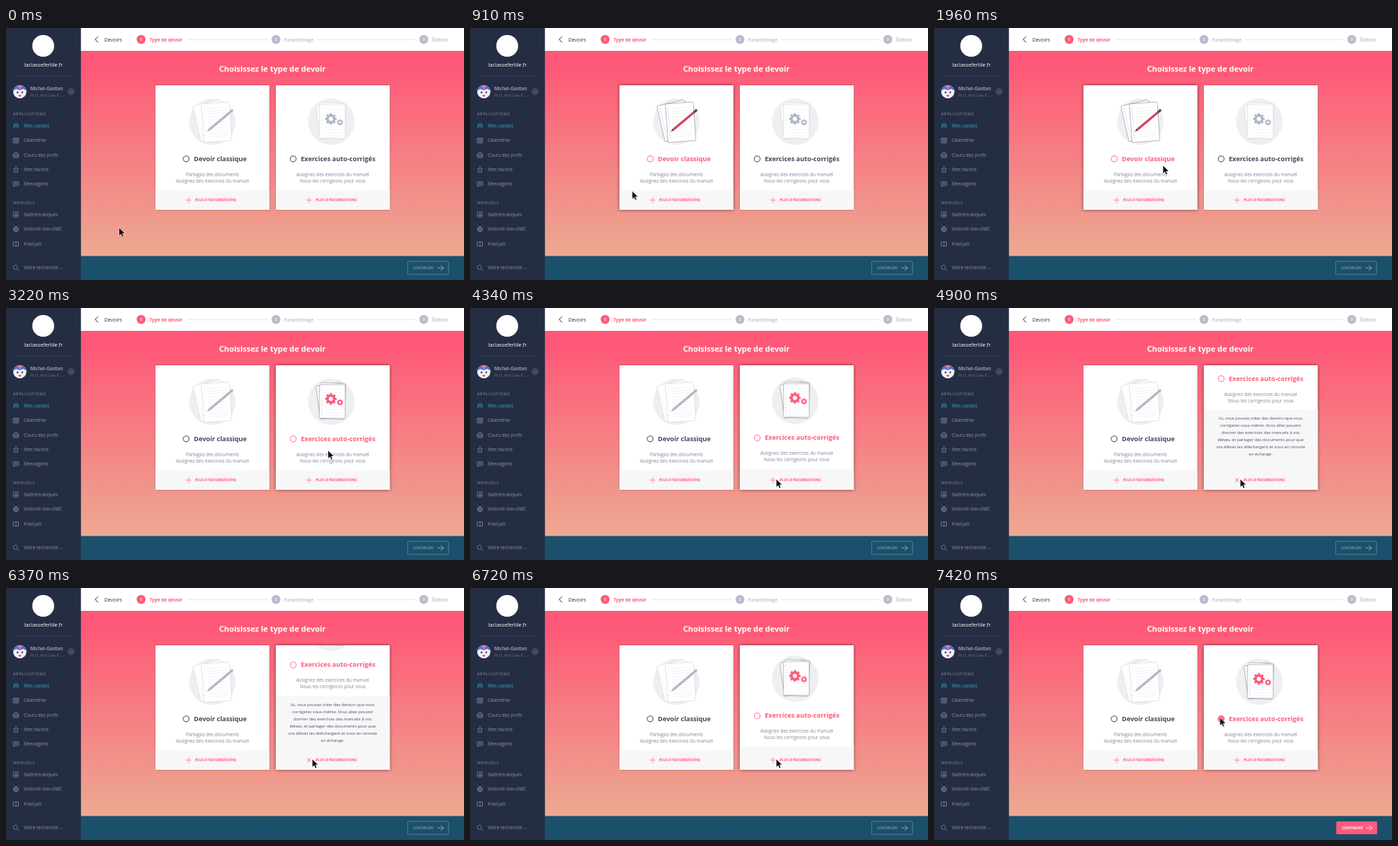
Write an HTML page that moves like this. It is 640 by 352 pixels and loops after 8.26 s.

```html
<!DOCTYPE html>
<html lang="fr">
<head>
<meta charset="utf-8">
<title>Choisissez le type de devoir</title>
<style>
@property --h { syntax: "<number>"; inherits: true; initial-value: 0; }
html, body { margin: 0; width: 100%; height: 100%; overflow: hidden; }
svg { display: block; width: 100vw; height: 100vh; font-family: "Open Sans", "Noto Sans", sans-serif; }
.mid { text-anchor: middle; }
.line { fill: none; stroke-linecap: round; stroke-linejoin: round; }
.menu { font-size: 6.5px; fill: #8d94a8; stroke: #8d94a8; }
.menu.on { fill: #14b8cb; stroke: #14b8cb; }
.menu text { stroke: none; }
.menu path { fill: none; stroke-width: .7; }
.head { font-size: 5.6px; font-weight: 600; letter-spacing: .62px; fill: #737b92; }
.step { font-size: 6.6px; font-weight: 600; fill: #b9bdcb; }
.step.on { font-size: 6.4px; font-weight: 700; fill: #ff5a7b; }
.step .num { font-size: 6px; fill: #fff; }
.box { fill: #fff; filter: drop-shadow(0 calc(.4px + .4px * var(--h)) calc(.8px + 1.5px * var(--h)) rgb(40 10 20 / calc(.42 + .25 * var(--h)))); }
.name { font-size: 9.1px; font-weight: 700; fill: color-mix(in srgb, #40475f, #ff5a7b calc(var(--h) * 100%)); }
.radio { fill: #fff; stroke-width: calc(1.15px - .25px * var(--h)); stroke: color-mix(in srgb, #565d76, #ff5a7b calc(var(--h) * 100%)); }
.desc { font-size: 6.5px; fill: #81879b; }
.more { font-size: 5px; font-weight: 700; fill: #ff5a7b; }
.plus { stroke: #ff5a7b; stroke-width: .65; transform-box: fill-box; transform-origin: center; }
.sheet { fill: #fff; stroke-width: .55; stroke: color-mix(in srgb, #ccd0da, #7d849a calc(var(--h) * 100%)); }
.rows { stroke: #e6e8ed; stroke-width: .5; }
.tint { color: color-mix(in srgb, #b1b6c3, #ff5a7b calc(var(--h) * 100%)); }
.lead { color: color-mix(in srgb, #b1b6c3, #d8435f calc(var(--h) * 100%)); }
.dark { color: color-mix(in srgb, #b1b6c3, #40475f calc(var(--h) * 100%)); }
.tint, .lead, .dark { fill: currentColor; }
.gear circle { fill: none; stroke: currentColor; }
.info { font-size: 5.85px; font-weight: 500; fill: #474d64; }
.panel { fill: #f7f7f8; }
</style>
</head>
<body>
<svg viewBox="0 0 640 352" preserveAspectRatio="none"></svg>
<script>
const LOOP = 8260, TICK = 70, RISE = 84;
const stage = document.querySelector('svg');

const text = (x, y, label, cls = '') => `<text x="${x}" y="${y}" class="${cls}">${label}</text>`;

const menuItem = ([y, label, icon, on]) => `
  <g class="menu ${on ? 'on' : ''}">
    <path class="line" transform="translate(10 ${y - 4})" d="${icon}"/>
    ${text(25, y + 2.2, label)}
  </g>`;

const menu = [
  [136.5, 'Mes classes', 'M2.2 2.6a1.8 1.8 0 1 0 3.6 0a1.8 1.8 0 1 0-3.6 0M1.4 7.6Q1.6 4.8 4 4.8T6.6 7.6M1.6 1.2Q.2 2.4 1.4 3.8Q.2 4.6 0 6.6M6.4 1.2Q7.8 2.4 6.6 3.8Q7.8 4.6 8 6.6', true],
  [157, 'Calendrier', 'M.5 1.2H7.5V7.6H.5ZM.5 3H7.5M2.3.3V1.8M5.7.3V1.8M2 4.6H6M2 6H6'],
  [177.5, 'Cours des profs', 'M.5 3.2H7.5V7.5H.5ZM1.2 3L2 .8H6L6.8 3M.5 5H2.6V6H5.4V5H7.5'],
  [198, 'Mes favoris', 'M4 .3L5.1 2.8 7.8 3.1 5.8 4.9 6.4 7.6 4 6.2 1.6 7.6 2.2 4.9.2 3.1 2.9 2.8Z'],
  [218, 'Messagerie', 'M.5.8H7.5V6H3.2L1.5 7.5V6H.5ZM2 2.6H6M2 4.2H5'],
  [260.5, 'Mathématiques', 'M.8.5H7.2V7.5H.8ZM2.2 6L4 2.2 5.8 6M2.8 4.8H5.2'],
  [281, 'Histoire-Géo-EMC', 'M.4 4a3.6 3.6 0 1 0 7.2 0a3.6 3.6 0 1 0-7.2 0M.4 4H7.6M4 .4Q.8 4 4 7.6Q7.2 4 4 .4'],
  [301.5, 'Français', 'M.5 1H3.2L4 1.8 4.8 1H7.5V7H4.8L4 7.6 3.2 7H.5ZM4 1.8V7.6'],
  [335, 'Votre recherche ...', 'M.3 3.3a2.9 2.9 0 1 0 5.8 0a2.9 2.9 0 1 0-5.8 0M5.4 5.4L7.9 7.9'],
];

const step = (x, n, label, on) => `
  <g class="step ${on ? 'on' : ''}">
    <circle cx="${x}" cy="16" r="6.2"/>
    ${text(x, 18.3, n, 'num mid')}${text(x + 11.5, 18.6, label)}
  </g>`;

const sheet = (x, y, angle, w, h) => {
  let rows = '';
  for (let r = 7; r < h - 3; r += 4) rows += `M8 ${r}H${w - 4}`;
  return `<g transform="translate(${x} ${y}) rotate(${angle})">
    <rect class="sheet" width="${w}" height="${h}" rx="1.5"/>
    <path class="rows" d="${rows}"/>
    <path class="sheet" stroke-dasharray="1 2.6" d="M3.5 4V${h - 3}"/>
  </g>`;
};

const gear = (x, y, r) => {
  const tooth = 2 * Math.PI * r / 16;
  return `<g class="tint gear" transform="translate(${x} ${y}) rotate(-11)">
    <circle r="${r * .68}" stroke-width="${r * .5}"/>
    <circle r="${r}" stroke-width="${r * .32}" stroke-dasharray="${tooth}"/>
  </g>`;
};

const papers = sheet(261, 109, -13, 39, 51) + sheet(273, 106, -4, 39, 54) + `
  <g transform="translate(280.5 145) rotate(-40)">
    <path class="dark" d="M0 0L5-1.6V1.6Z"/>
    <rect class="lead" x="5" y="-1.6" width="37" height="3.2"/>
    <rect class="dark" x="42" y="-1.6" width="6" height="3.2" rx="1"/>
  </g>`;
const gears = sheet(433, 109, -8, 34, 47) + sheet(441, 104, 3, 34, 50) + sheet(438, 107, 0, 36, 47)
  + gear(454, 127, 7) + gear(466.7, 131.8, 3.7);

const card = ({ id, x, mid, disc, radio, name, lines, art, plus, extra = '' }) => `
  <g id="${id}">
    <rect class="box" x="${x}" y="80" width="159.3" height="174" rx="1"/>
    <clipPath id="${id}-clip"><rect x="${x}" y="80" width="159.3" height="174" rx="1"/></clipPath>
    <g clip-path="url(#${id}-clip)">
      <g class="slide">
        <circle cx="${disc}" cy="131" r="32.5" fill="#eeeff1"/>
        ${art}
        <circle class="radio" cx="${radio}" cy="182.8" r="4.1"/>
        <circle class="dot" cx="${radio}" cy="182.8" r="4.6" fill="#ff5a7b" opacity="0"/>
        ${text(radio + 10.7, 185.5, name, 'name')}
        ${lines.map((line, i) => text(mid, 206.6 + 8.9 * i, line, 'desc mid')).join('')}
        <rect class="panel" x="${x}" y="226.3" width="160" height="120"/>
      </g>
      ${extra}
      <path class="plus" d="M${plus - 4} 240.4h8M${plus} 236.4v8"/>
      ${text(plus + 9.2, 242.3, "PLUS D'INFORMATIONS", 'more')}
    </g>
  </g>`;

const info = [
  'Ici, vous pouvez créer des devoirs que vous',
  'corrigerez vous-même. Vous allez pouvoir',
  'donner des exercices des manuels à vos',
  'élèves, et partager des documents pour que',
  'vos élèves les téléchargent et vous en renvoie',
  'en échange.',
].map((line, i) => text(456.5, 156.3 + RISE + 10 * i, line, 'info mid')).join('');

const button = (x, fill, stroke, ink, weight) => `
  <rect x="${x}" y="326" width="57" height="18" rx="1" fill="${fill}" stroke="${stroke}" stroke-width=".7"/>
  <text x="${x + 7.8}" y="337" font-size="4.95" font-weight="${weight}" fill="${ink}">CONTINUER</text>
  <path class="line" d="M${x + 42} 335h8m-3.6-3.6l3.6 3.6-3.6 3.6" stroke="${ink}" stroke-width=".8"/>`;

stage.innerHTML = `
  <linearGradient id="sky" x2="0" y2="1">
    <stop offset=".05" stop-color="#ff5777"/><stop offset="1" stop-color="#eca991"/>
  </linearGradient>
  <rect width="640" height="352" fill="#fff"/>
  <rect x="104" y="32" width="536" height="287" fill="url(#sky)"/>
  <rect x="104" y="318.5" width="536" height="34" fill="#1b506c"/>

  <rect width="104.7" height="352" fill="#252d43"/>
  <circle cx="52" cy="25" r="15.3" fill="#fff"/>
  <text x="52.5" y="53.6" class="mid" font-size="7.3" font-weight="500" fill="#fff">laclassefertile.fr</text>
  <path d="M10 67.3H95" stroke="#39425a" stroke-width=".7"/>
  <clipPath id="face"><circle cx="19.3" cy="89" r="9.3"/></clipPath>
  <g clip-path="url(#face)">
    <rect x="9" y="79" width="21" height="21" fill="#f3edf5"/>
    <path d="M9 79H30V88L24 85 19 87 14 85 9 89Z" fill="#3d74d6"/>
    <path d="M14 79L19.3 86 25 79Z" fill="#ef6f93"/>
    <circle cx="16" cy="90" r="1.2" fill="#30395a"/><circle cx="22.7" cy="90" r="1.2" fill="#30395a"/>
    <ellipse cx="19.3" cy="94.5" rx="2" ry="1.3" fill="#e4587c"/>
  </g>
  <text x="33.7" y="86.7" font-size="6.6" font-weight="600" fill="#aeb5c5">Michel-Gaston</text>
  <text x="33.7" y="95.6" font-size="5.5" fill="#68718a">Prof. Hist-Géo-E...</text>
  <g class="line" stroke="#8089a0" stroke-width=".75">
    <circle cx="91" cy="89" r="1.5"/>
    <path d="M91 84.8L94.6 86.9V91.1L91 93.2 87.4 91.1V86.9Z"/>
  </g>
  ${text(9.8, 122.2, 'APPLICATIONS', 'head')}${text(9.8, 246.4, 'MANUELS', 'head')}
  ${menu.map(menuItem).join('')}

  <path class="line" d="M128.5 12L124.7 16l3.8 4" stroke="#2c3349" stroke-width="1"/>
  <text x="137.3" y="18.6" font-size="7.1" fill="#2c3349">Devoirs</text>
  <path d="M254 16.3H367M435 16.3H572" stroke="#dcdee5" stroke-width=".8"/>
  ${step(188.8, 1, 'Type de devoir', true)}${step(377.3, 2, 'Parametrage')}${step(583.8, 3, 'Édition')}

  <text x="372.3" y="61.2" class="mid" font-size="10.95" font-weight="700" fill="#fff">Choisissez le type de devoir</text>
  ${card({
    id: 'classic', x: 208.8, mid: 288.5, disc: 288.5, radio: 251.8, plus: 255, art: papers,
    name: 'Devoir classique', lines: ['Partagez des documents', 'Assignez des exercices du manuel'],
  })}
  ${card({
    id: 'auto', x: 377, mid: 456.7, disc: 454.5, radio: 401.3, plus: 423.5, art: gears,
    name: 'Exercices auto-corrigés', lines: ['Assignez des exercices du manuel', 'Nous les corrigeons pour vous'],
    extra: `<clipPath id="above"><rect x="377" y="80" width="160" height="146"/></clipPath>
      <g clip-path="url(#above)"><g class="slide">${info}</g></g>`,
  })}

  <g id="idle">${button(561.3, 'none', '#6f92a4', '#a3b9c5', 400)}</g>
  <g id="ready" opacity="0">${button(562.2, '#ff5a7b', 'none', '#fff', 700)}</g>
  <path id="cursor" d="M0 0V11.2L2.6 8.9 4.4 12.7 6.3 11.9 4.6 8.1H8.2Z" fill="#0c0c10" stroke="#fff" stroke-width=".5"/>`;

// Each step is [time, properties, easing towards the next step].
const animations = [];
const animate = (selector, steps) => {
  const all = [[0, steps[0][1]], ...steps, [LOOP, steps.at(-1)[1]]];
  const frames = all.map(([time, props, easing = 'linear']) => ({ offset: time / LOOP, easing, ...props }));
  for (const el of stage.querySelectorAll(selector)) {
    const animation = el.animate(frames, { duration: LOOP, fill: 'both' });
    animation.pause();
    animations.push(animation);
  }
};

const hover = value => ({ '--h': value });
const fade = value => ({ opacity: value });
const move = (x, y) => ({ transform: `translate(${x}px, ${y}px)` });
const turn = angle => ({ transform: `rotate(${angle}deg)` });
const toggle = (selector, shut, open) => animate(selector, [
  [4322, shut, 'ease'], [4890, open], [6310, open, 'ease'], [6880, shut],
]);

animate('#cursor', [
  [0, 158, 279], [600, 210, 238], [840, 221, 230.5], [1680, 288, 197.5], [1960, 320, 192],
  [2450, 372, 191.5], [3220, 450, 199], [3360, 452.5, 207], [4130, 428, 239],
  [6750, 428, 239], [7300, 399.5, 181],
].map(([time, x, y]) => [time, move(x, y)]));

animate('#classic', [[600, hover(0)], [820, hover(1)], [2400, hover(1)], [2700, hover(0)]]);
animate('#auto', [[2480, hover(0)], [2760, hover(1)]]);
toggle('#auto .slide', move(0, 0), move(0, -RISE));
toggle('#auto .plus', turn(0), turn(45));
animate('#auto .dot', [[7270, fade(0)], [7400, fade(.85)]]);
animate('#ready', [[7270, fade(0)], [7410, fade(1)]]);
animate('#idle', [[7270, fade(1)], [7410, fade(0)]]);

const draw = () => {
  const time = Math.floor(performance.now() % LOOP / TICK) * TICK;
  for (const animation of animations) animation.currentTime = time;
  requestAnimationFrame(draw);
};
draw();
</script>
</body>
</html>
```
